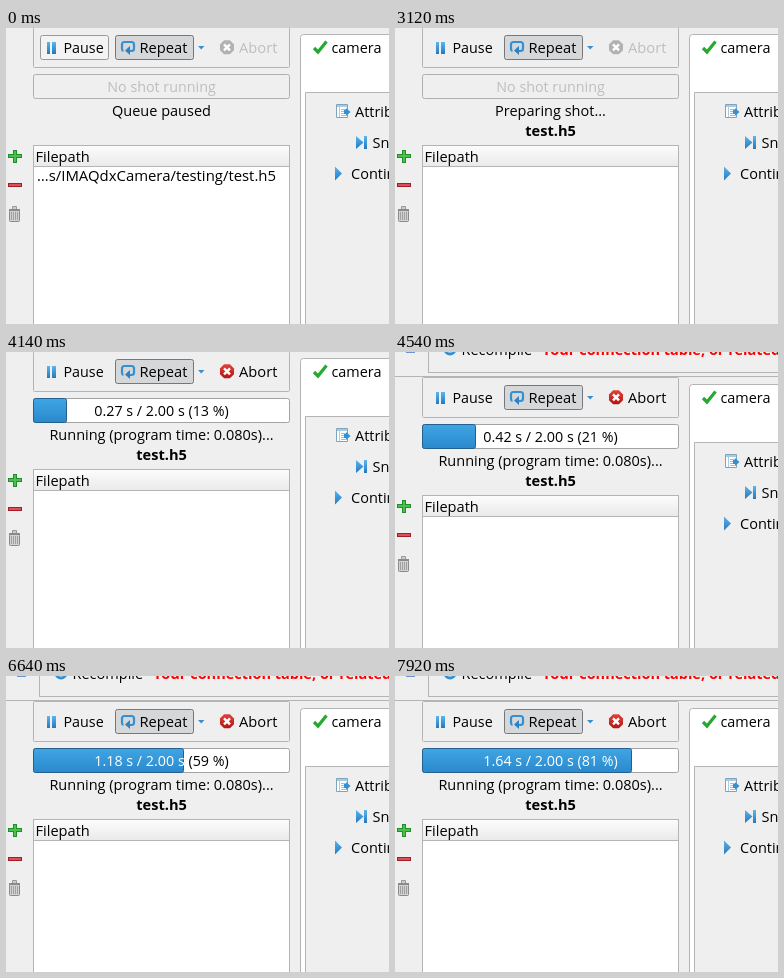
Write an HTML page with a canvas that moves like this. It is 383 px wide and 296 px high and loops after 8000 ms.

```html
<!DOCTYPE html>
<html lang="en">
<head>
<meta charset="utf-8">
<title>Shot queue</title>
<style>
  html, body { margin: 0; width: 100%; height: 100%; overflow: hidden; background: #efefef; }
  canvas { display: block; }
</style>
</head>
<body>
<canvas id="stage" width="383" height="296"></canvas>
<script>
const ctx = document.getElementById('stage').getContext('2d');
const W = 383, H = 296, LOOP = 8000;
const FONT = '"Open Sans", "Noto Sans", sans-serif';
const BG = '#efefef', LINE = '#b4b4b4', INK = '#000', FADED = '#bebebe', BLUE = '#3390d2';
const DURATION = 2, TICK = 60, NOTICE_H = 26;

const PRESS = 500, UNPAUSE = 1160, PREPARE = 3120, BUSY = 3140, RUN = 3300, NOTICE = 4300;

// [ms, seconds elapsed in the shot]
const PROGRESS = [[RUN, 0], [3400, 0], [3700, 0.112], [4540, 0.421], [5520, 0.772],
  [6640, 1.181], [7920, 1.638], [LOOP, 1.667]];

function elapsedAt(t) {
  let i = 0;
  while (i < PROGRESS.length - 2 && t >= PROGRESS[i + 1][0]) i++;
  const [t0, v0] = PROGRESS[i], [t1, v1] = PROGRESS[i + 1];
  const tick = Math.floor((t - t0) / TICK) * TICK;
  return v0 + (v1 - v0) * tick / (t1 - t0);
}

function text(str, x, y, { color = INK, size = 14.5, weight = 500, align = 'left' } = {}) {
  ctx.font = `${weight} ${size}px ${FONT}`;
  ctx.textAlign = align;
  ctx.fillStyle = color;
  ctx.fillText(str, x, y);
}

function rect(x, y, w, h, color) {
  ctx.fillStyle = color;
  ctx.fillRect(x, y, w, h);
}

function box(x, y, w, h, fill, stroke, r = 2) {
  ctx.beginPath();
  ctx.roundRect(x + 0.5, y + 0.5, w - 1, h - 1, r);
  ctx.fillStyle = fill;
  ctx.fill();
  ctx.lineWidth = 1;
  ctx.strokeStyle = stroke;
  ctx.stroke();
}

function poly(points, color) {
  ctx.beginPath();
  points.forEach(([x, y]) => ctx.lineTo(x, y));
  ctx.closePath();
  ctx.fillStyle = color;
  ctx.fill();
}

function path(points, color, width) {
  ctx.beginPath();
  points.forEach(([x, y]) => ctx.lineTo(x, y));
  ctx.strokeStyle = color;
  ctx.lineWidth = width;
  ctx.stroke();
}

function shade(y0, y1, top, bottom) {
  const g = ctx.createLinearGradient(0, y0, 0, y1);
  g.addColorStop(0, top);
  g.addColorStop(1, bottom);
  return g;
}

function glyphBlue(y0, y1) {
  return shade(y0, y1, '#5bb6ee', '#2577bd');
}

function repeatIcon() {
  ctx.beginPath();
  ctx.roundRect(116, 14, 12, 9, 2.5);
  ctx.strokeStyle = BLUE;
  ctx.lineWidth = 2.2;
  ctx.stroke();
  rect(117.5, 21, 3, 4, '#d6d7d8');
  poly([[119, 22.5], [124, 18], [124, 27]], '#2c82c6');
}

function abortIcon(on) {
  const pts = [];
  for (let i = 0; i < 8; i++) {
    const a = (i + 0.5) * Math.PI / 4;
    pts.push([221 + 7.6 * Math.cos(a), 19.3 + 7.6 * Math.sin(a)]);
  }
  poly(pts, on ? shade(12, 27, '#e0443c', '#b3120f') : '#b2b2b2');
  path([[218, 16.3], [224, 22.3]], '#fff', 2.4);
  path([[224, 16.3], [218, 22.3]], '#fff', 2.4);
}

function toolbar(t) {
  box(27, -1, 257, 41, BG, LINE, 1);
  if (t < PRESS) box(34, 7, 69, 25, '#f3f3f3', '#9a9a9a');
  else if (t < UNPAUSE) box(34, 7, 69, 25, '#d6d7d8', '#9a9a9a');
  rect(41, 14, 3, 12, glyphBlue(14, 26));
  rect(46, 14, 4, 12, glyphBlue(14, 26));
  text('Pause', 57.5, 25, { size: 14.3 });

  box(109, 7, 79, 25, '#d6d7d8', '#74787c');
  repeatIcon();
  text('Repeat', 133.5, 25, { size: 14.7 });
  poly([[192, 18], [198.5, 18], [195.2, 21.5]], '#3d8fcb');

  const on = t >= RUN;
  abortIcon(on);
  text('Abort', 233, 25, { size: 14.7, color: on ? INK : FADED });
}

function progressBar(t) {
  const mid = { align: 'center', size: 14.3 };
  if (t < RUN) {
    box(27, 46, 257, 25, BG, '#b0b0b0');
    text('No shot running', 155.5, 64, { ...mid, color: FADED });
    return;
  }
  const s = elapsedAt(t), frac = s / DURATION;
  const edge = 27 + Math.round(256 * frac);
  const label = `${s.toFixed(2)} s / ${DURATION.toFixed(2)} s (${Math.floor(frac * 100)} %)`;
  box(27, 46, 257, 25, '#fff', '#a3a3a3');
  text(label, 155.5, 64, mid);
  if (edge < 29) return;
  ctx.save();
  ctx.beginPath();
  ctx.rect(27, 46, edge - 27, 25);
  ctx.clip();
  box(27, 46, edge - 27, 25, shade(46, 71, '#40a6e4', '#2a88cd'), '#24608f');
  text(label, 155.5, 64, { ...mid, color: '#fff' });
  ctx.restore();
}

function status(t) {
  const mid = { align: 'center' };
  if (t < PREPARE) {
    text('Queue paused', 155.5, 88, mid);
    return;
  }
  text(t < RUN ? 'Preparing shot...' : 'Running (program time: 0.080s)...', 155.5, 88, mid);
  text('test.h5', 155.5, 108, { ...mid, weight: 700, size: 14.6 });
}

function plusIcon() {
  rect(7, 122, 4, 13, '#1f8f28');
  rect(2, 126, 14, 4, '#1f8f28');
  rect(8, 123, 2, 11, '#4cc04f');
  rect(3, 127, 12, 2, '#4cc04f');
}

function minusIcon() {
  rect(2, 155, 14, 4, '#a51d26');
  rect(3, 156, 12, 2, '#d9525a');
}

function binIcon() {
  box(6, 178, 5, 4, '#ccc', '#999', 0);
  box(3, 182, 11, 12, '#d2d2d2', '#8a8a8a', 1);
  rect(3, 181, 11, 2, '#8a8a8a');
  for (let x = 5; x < 13; x += 2) rect(x, 184, 1, 8, '#a0a0a0');
}

function queue(t) {
  plusIcon();
  minusIcon();
  binIcon();

  rect(27, 117, 257, 220, '#fff');
  rect(27, 117, 257, 22, shade(117, 139, '#fdfdfd', '#e9e9e9'));
  ctx.strokeStyle = LINE;
  ctx.lineWidth = 1;
  ctx.strokeRect(27.5, 117.5, 256, 220);
  rect(27, 138, 257, 1, LINE);
  text('Filepath', 29.5, 134, { size: 14.6 });
  if (t < PREPARE) text('…s/IMAQdxCamera/testing/test.h5', 31, 153, { size: 14.9 });
}

function tabIcon(busy) {
  if (busy) {
    rect(309, 12, 11, 2, '#7a5a33');
    rect(309, 26, 11, 2, '#7a5a33');
    poly([[310, 14], [319, 14], [310, 26], [319, 26]], '#c9a765');
  } else {
    path([[308, 20], [312, 24], [320.5, 13.5]], '#27a832', 3.2);
  }
}

function attributesIcon() {
  box(330, 76, 12, 14, '#fff', '#7fa3bd', 0);
  rect(331, 77, 10, 2, '#a9cbe2');
  rect(333, 79, 1, 10, '#a9cbe2');
  for (let y = 81; y < 89; y += 2) rect(335, y, 5, 1, '#9fbfd4');
  poly([[338, 82], [340, 82], [340, 80], [344.5, 84], [340, 88], [340, 86], [338, 86]], BLUE);
}

function cameraTab(t) {
  box(294, 6, 120, 330, '#fff', LINE, 3);
  tabIcon(t >= BUSY && t < RUN);
  text('camera', 325.5, 25, { size: 14.4 });

  box(299, 64, 120, 280, BG, LINE, 0);
  attributesIcon();
  text('Attributes', 349, 89);
  poly([[350, 108], [357.5, 114.5], [350, 121]], glyphBlue(108, 121));
  rect(358, 108, 3, 13, glyphBlue(108, 121));
  text('Snap', 366.5, 120);
  poly([[329, 138.5], [336, 145.5], [329, 152.5]], glyphBlue(138, 153));
  text('Continuous', 345, 151);
}

function notice() {
  rect(33, 0, 1, 21, LINE);
  rect(33, 20, W - 33, 1, LINE);
  rect(0, 24, W, 1, LINE);
  rect(11, 0, 9, 1, '#6f93cf');
  ctx.beginPath();
  ctx.arc(55, -3, 5, 0, Math.PI);
  ctx.strokeStyle = BLUE;
  ctx.lineWidth = 3;
  ctx.stroke();
  text('Recompile', 66.5, 3);
  text('Your connection table, or related', 147, 3, { color: '#f00', weight: 700 });
}

function draw(t) {
  const shown = t >= NOTICE;
  rect(0, 0, W, H, BG);
  ctx.save();
  if (shown) ctx.translate(0, NOTICE_H);
  toolbar(t);
  progressBar(t);
  status(t);
  queue(t);
  cameraTab(t);
  ctx.restore();
  if (shown) notice();
}

const start = performance.now();
function frame() {
  draw((performance.now() - start) % LOOP);
  requestAnimationFrame(frame);
}
frame();
</script>
</body>
</html>
```
